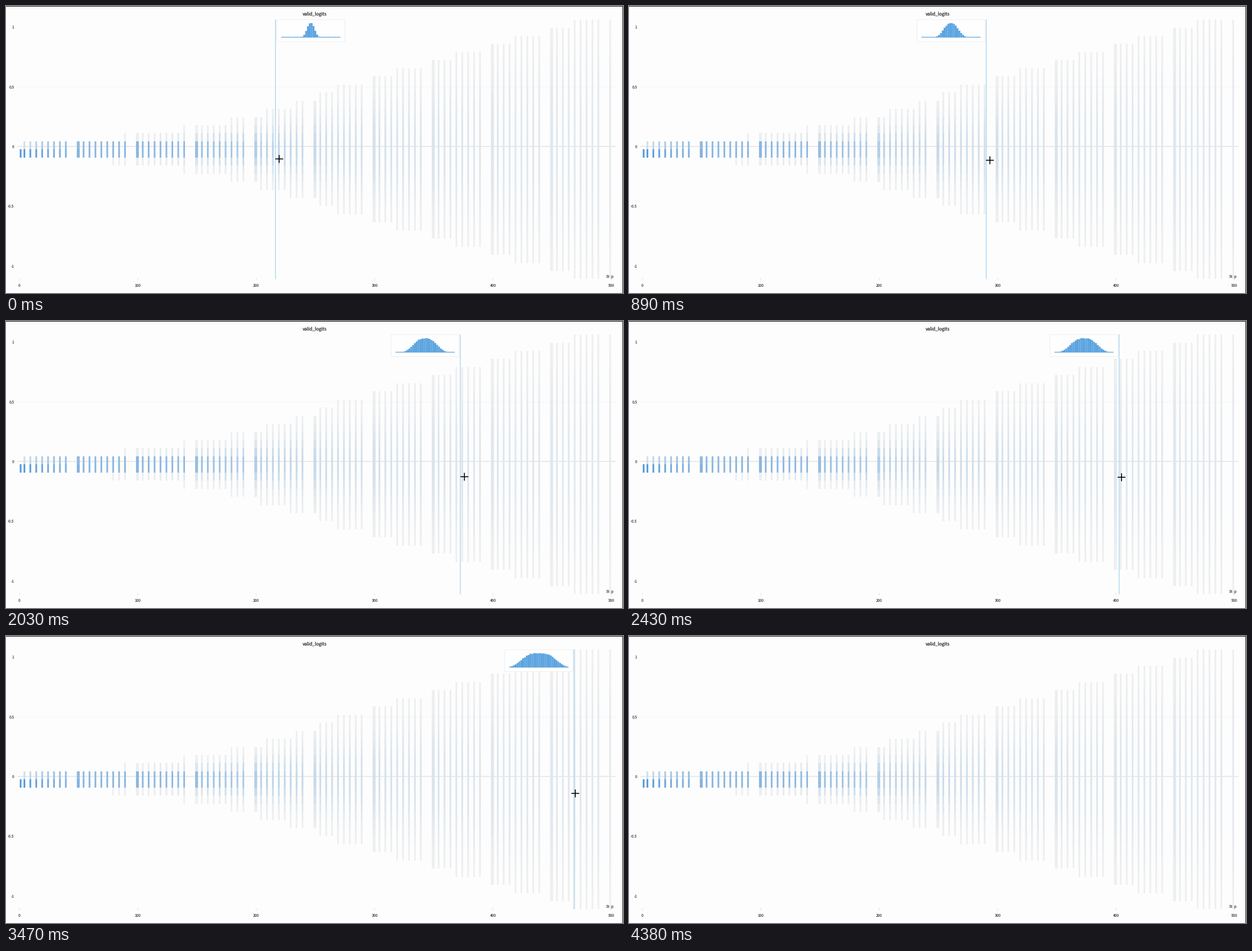
Write a matplotlib script that moves like this. It is 1096 px wide and 511 px high and loops after 6870 ms.

```python
import numpy as np
import matplotlib.pyplot as plt
from matplotlib.animation import FuncAnimation
from matplotlib.collections import PolyCollection
from matplotlib.patches import Rectangle

W, H, DPI = 1096, 511, 64
INTERVAL, LOOP = 30, 6870
CELL, MID = 14.45, 255.3      # heatmap cell height, centre row
X0, PER_STEP = 24.3, 2.102    # step axis
PALE, DEEP = np.array([240, 240, 240]) / 255, np.array([54, 136, 213]) / 255

plt.rcParams["text.hinting"] = "none"
fig = plt.figure(figsize=(W / DPI, H / DPI), dpi=DPI, facecolor="#fdfdfd")
ax = fig.add_axes([0, 0, 1, 1])
ax.set_xlim(0, W)
ax.set_ylim(H, 0)
ax.axis("off")


def px(n):
    return n * 72 / DPI


def box(x, y, w, h):
    return [(x, y), (x + w, y), (x + w, y + h), (x, y + h)]


def strip(x, y, w, h, color, z=1):
    return ax.add_patch(Rectangle((x, y), w, h, fc=color, lw=0, snap=False, zorder=z))


def boxes(verts, colors, z):
    return ax.add_collection(PolyCollection(verts, facecolors=colors, linewidths=0,
                                            snap=False, zorder=z), autolim=False)


def label(x, y, s, size=6.6, color="#505050", ha="center"):
    ax.text(x, y, s, fontsize=px(size), color=color, family="Noto Sans CJK JP",
            ha=ha, va="center_baseline", zorder=1.5)


# Window edge, guides and labels
strip(0, 0, W, 1, "#111111", 9)
strip(W - 1, 0, 1, H, "#222222", 9)
strip(20, 143.5, 1063, 1, "#f7f7f7")
strip(20, 249.3, 1063, 1.5, "#e2e4e6")
for v in (1, 0.5, 0, -0.5, -1):
    label(14.6, 250.3 - 212.6 * v, f"{v:g}", ha="right")
for v in range(0, 501, 100):
    x = 24 + PER_STEP * v
    strip(x - 0.5, 484, 1, 5, "#e4e4e4")
    label(x, 497.3, str(v))
label(1073, 480.6, "Step")
label(547.5, 13.8, "valid_logits", 8, "#2c2c2c")


# Heatmap columns: a spreading distribution binned into cells
def reach(step, a, b, power):
    """Number of filled cells on one side: slow growth, then two per 50 steps."""
    n = np.arange(1, 17)
    m, k = np.maximum(7 - n, 0), np.maximum(n - 7, 0)
    late = np.where(k > 0, 25 * k - 5 - 5 * (k % 2), 0)
    return np.sum(step >= 254 + late - a * m - b * m ** power)


def cell_shares(step):
    spread = 0.5 + np.logaddexp(0, (step - 165) / 30)
    power = 2 + 0.65 * np.clip((step - 216) / 253, 0, 1)
    u = np.linspace(-16, 16, 32 * 20 + 1)[:-1] + 0.025
    mean = 0.5 * np.exp(-step / 18)
    d = np.exp(-np.abs((u - mean) / spread) ** power).reshape(32, 20).sum(axis=1)
    return d / d.sum()


steps = [0] + [s for s in range(4, 500, 5) if s % 50 != 44] + list(range(50, 500, 50))
cells, colors = [], []
for s in sorted(steps):
    share = cell_shares(s)
    top = max(reach(s, 17, 3.2, 2), int(s > 0))
    bottom = reach(s, 25, 1 / 60, 5)
    x = max(X0 + PER_STEP * s, 26) - 1.5
    for n in range(-top, bottom):
        y0, y1 = round(MID + CELL * n), round(MID + CELL * (n + 1))
        cells.append(box(x, y0, 3, y1 - y0))
        colors.append(PALE + (DEEP - PALE) * share[n + 16] ** 0.85)
boxes(cells, colors, 2)

# Hover marker, histogram card and crosshair
marker = strip(0, 24, 1.3, 462.5, "#a6d2f0", 4)
card = ax.add_patch(Rectangle((0, 24.5), 121, 39, fc="#fefefe", ec="#eeeeee",
                              lw=px(1), snap=False, zorder=5))
hist = boxes([], "#5ca4e0", 6)
cross_h = strip(0, 0, 14, 1.6, "black", 8)
cross_v = strip(0, 0, 1.6, 14, "black", 8)
hover = [marker, card, hist, cross_h, cross_v]

# The pointer moves in even ticks; the marker trails it
TICK, LEAD, POSES = 129.1, 77, 34
KEYS = [0, 3, 5, 10, 16, 21, 27, 33]
POINTER = [485, 566, 612, 684, 814, 915, 1011, 1088]
TRAIL = [478.6, 554.6, 605, 679, 807, 913, 1009, 1082]


def hist_bars(left, progress):
    w = 105 / 32
    u = (np.arange(32) - 15.5) * w
    h = np.exp(-np.abs(u / (9 + 27 * progress)) ** (2.1 + 0.85 * progress))
    h *= 1 + 0.03 * np.random.default_rng(int(left)).uniform(-1, 1, 32)
    h = np.maximum(25.8 * h / h.max(), 1.3)
    return [box(left + 8 + i * w, 56.2 - v, w, v) for i, v in enumerate(h)]


def update(frame):
    pose = int((frame * INTERVAL + LEAD) / TICK)
    for artist in hover:
        artist.set_visible(pose < POSES)
    if pose >= POSES:
        return hover
    x = np.interp(pose, KEYS, TRAIL)
    left = x + 2.2 if x < 540 else x - 123
    marker.set_x(x - 0.65)
    card.set_x(left)
    hist.set_verts(hist_bars(left, (x - TRAIL[0]) / 530))
    cx = np.interp(pose, KEYS, POINTER) + 0.3
    cy = 272.3 + (cx - POINTER[0]) / 66
    cross_h.set_xy((cx - 7, cy - 0.8))
    cross_v.set_xy((cx - 0.8, cy - 7))
    return hover


anim = FuncAnimation(fig, update, frames=LOOP // INTERVAL, interval=INTERVAL,
                     repeat=True, repeat_delay=0)
plt.show()
```
